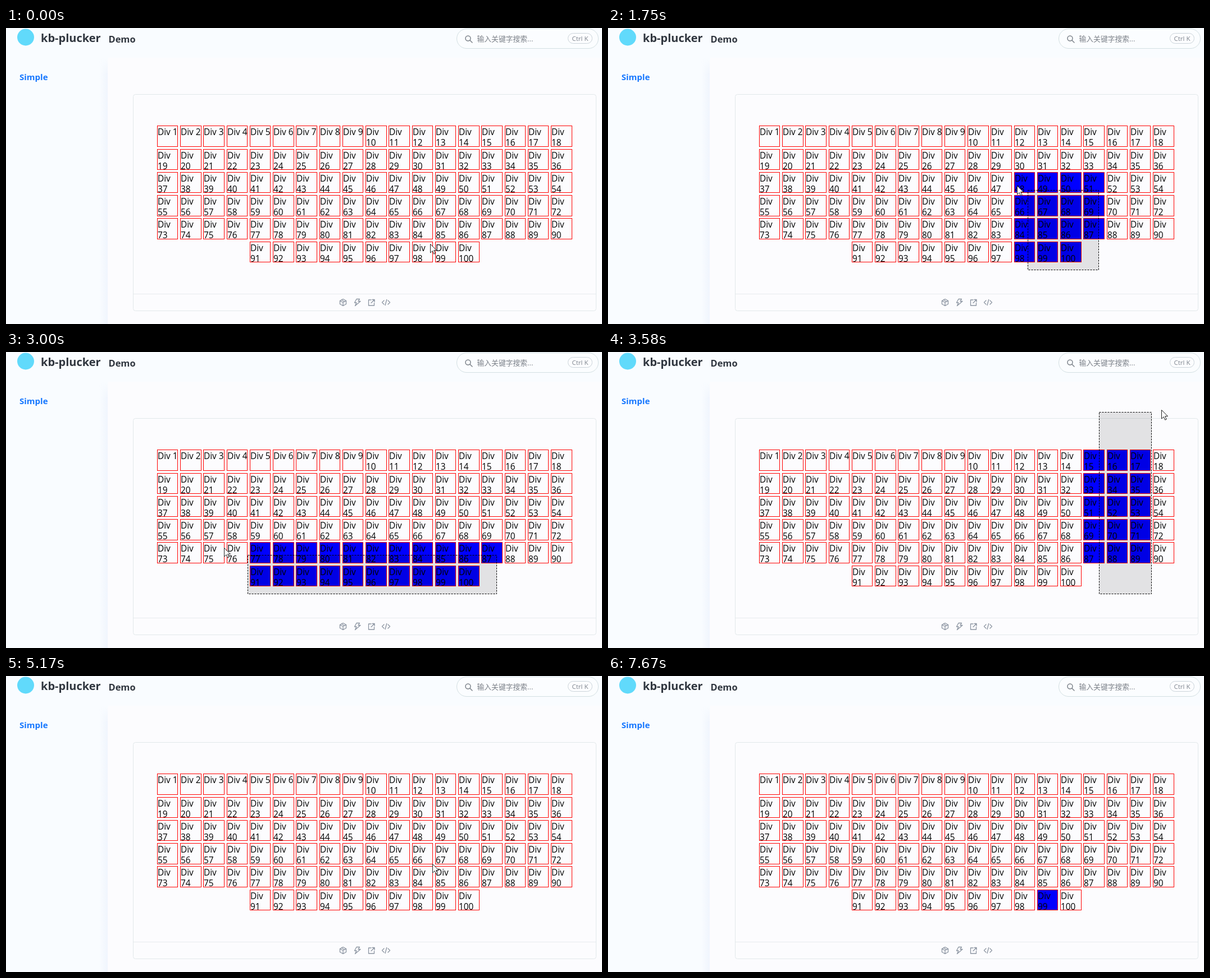
Recreate the animation shown at these times as an HTML page. Size 1061x528 px, loop 8160 ms.

```html
<!DOCTYPE html>
<html lang="zh">
<head>
<meta charset="utf-8">
<title>Box selection demo</title>
<style>
html, body { margin: 0; width: 100%; height: 100%; overflow: hidden; background: #f9fcff; }
svg { display: block; position: absolute; left: 0; top: 0; }
text { font-family: "Open Sans", "Noto Sans", sans-serif; }
.bold { font-weight: 700; }
.cjk { font-family: "Open Sans", "Noto Sans CJK SC", "Noto Sans CJK", sans-serif; }
.cell rect { fill: transparent; stroke: #f00; }
.cell.on rect { fill: #00f; }
.cell text { font-size: 15.4px; }
.icon { fill: none; stroke: #8b94a1; stroke-width: 1.3; stroke-linejoin: round; stroke-linecap: round; }
</style>
</head>
<body>
<svg width="1061" height="528" viewBox="0 0 1061 528">
  <defs>
    <linearGradient id="shade">
      <stop offset="0" stop-color="#f0f5fd" stop-opacity="0"/>
      <stop offset="1" stop-color="#f0f5fd"/>
    </linearGradient>
    <linearGradient id="fade" x2="0" y2="1">
      <stop offset="0" stop-color="#f9fcff"/>
      <stop offset="1" stop-color="#f9fcff" stop-opacity="0"/>
    </linearGradient>
  </defs>
  <rect width="1061" height="528" fill="#f9fcff"/>
  <rect x="166" y="53" width="15" height="475" fill="url(#shade)"/>
  <rect x="166" y="53" width="15" height="30" fill="url(#fade)"/>
  <rect x="181" y="53" width="880" height="475" fill="#fcfcfe"/>

  <circle cx="35" cy="16.5" r="15" fill="#61dafb"/>
  <text class="bold" x="62" y="25" font-size="20" fill="#30363f">kb-plucker</text>
  <text class="bold" x="182.5" y="25.5" font-size="16.4" fill="#30363f">Demo</text>
  <text class="bold" x="24" y="93" font-size="15" fill="#1677ff">Simple</text>

  <rect x="802.5" y="1.5" width="252" height="35" rx="17.5" fill="#fbfdff" stroke="#d3dfe2"/>
  <g fill="none" stroke="#7c828a" stroke-width="1.5" stroke-linecap="round">
    <circle cx="822.5" cy="18.5" r="4.5"/>
    <path d="M826 22l4 4"/>
  </g>
  <text class="cjk" x="838.5" y="23.5" font-size="12.8" fill="#7a7f87">输入关键字搜索...</text>
  <rect x="1000.5" y="9.5" width="43" height="18" rx="9" fill="#fcfdff" stroke="#ccd4da"/>
  <text x="1022" y="22.5" font-size="11.5" fill="#7f858e" text-anchor="middle">Ctrl K</text>

  <rect x="226.5" y="118.5" width="824" height="386" rx="4" fill="none" stroke="#e2e8ea"/>
  <path d="M227 474.5H1050" stroke="#e7ebee"/>
  <g class="icon">
    <path d="M600 483.5l5.5 3v6l-5.5 3-5.5-3v-6zM594.5 486.5l5.5 3 5.5-3M600 489.5v6M597.3 485l5.5 3"/>
    <path d="M624 483.5h5.5l-2.5 4h4l-9.5 8 2.5-5.5h-3.5z"/>
    <path d="M650 485h-4.5v10h10v-4.5M652 484.5h4v4M656 484.5l-6 6"/>
    <path d="M673 486l-3.5 3.5 3.5 3.5M680 486l3.5 3.5-3.5 3.5M677.7 484.5l-2.6 10"/>
  </g>

  <g id="cells"></g>
  <rect id="band" fill="#000" fill-opacity=".1" stroke="#000" stroke-dasharray="3 2"/>
  <path id="pointer" d="M.5.5V16l3.7-3.4 2.5 5.6 2.5-1.1-2.5-5.5H11.5z" fill="#fff" stroke="#222"/>
</svg>
<script>
const NS = 'http://www.w3.org/2000/svg';
const LOOP = 8160, FPS = 12, LAG = 33;
const COLS = 18, SIZE = 37.5, PITCH = 41.25, LEFT = 268.9, TOP = 174.4;
const $ = id => document.getElementById(id);

function add(parent, tag, attrs, text) {
  const el = document.createElementNS(NS, tag);
  setAll(el, attrs);
  if (text) el.textContent = text;
  return parent.appendChild(el);
}

function setAll(el, attrs) {
  for (const name in attrs) el.setAttribute(name, attrs[name]);
}

// A crisp one-pixel outline inside the given edges.
const outline = b => ({
  x: b.left + .5, y: b.top + .5,
  width: Math.max(0, b.right - b.left - 1),
  height: Math.max(0, b.bottom - b.top - 1)
});

// Turning points of the pointer: time, x, y.
const path = [
  [0, 755, 385], [760, 874, 432], [1290, 446, 226], [1450, 780, 320],
  [1750, 728, 281], [2150, 326, 143], [2340, 650, 270], [2580, 967, 118],
  [2760, 740, 424], [3000, 388, 349], [3110, 325, 300], [3600, 987, 103],
  [4130, 440, 310], [4250, 394, 240], [4360, 391, 200], [5000, 759, 335],
  [6083, 759, 335], [6420, 809, 418], [6750, 470, 172], [7000, 427, 215],
  [7080, 400, 240], [7420, 782, 402], [7583, 922, 463]
];

// Cells to the right of limit do not react.
const drags = [
  { from: 760, to: 4450, clear: 5160, x: 874, y: 432, limit: 1061 },
  { from: 6440, to: 7200, clear: 7400, x: 822, y: 437, limit: 803 }
];
const CLICK = 7400, CLICKED = 99, HIDE = 7660;

// Speed along one axis at a key point: zero where the direction turns.
function speed(i, axis) {
  const a = path[i - 1], b = path[i], c = path[i + 1];
  if (!a || !c || (b[axis] - a[axis]) * (c[axis] - b[axis]) <= 0) return 0;
  return (c[axis] - a[axis]) / (c[0] - a[0]);
}

// Smooth cubic through the key points.
function pointerAt(t) {
  const next = path.findIndex(p => p[0] > t);
  if (next < 0) return path[path.length - 1].slice(1);
  const i = next - 1, a = path[i], b = path[next];
  const span = b[0] - a[0], s = (t - a[0]) / span, r = 1 - s;
  return [1, 2].map(axis => Math.round(
    a[axis] * r * r * (1 + 2 * s) + b[axis] * s * s * (3 - 2 * s) +
    span * s * r * (speed(i, axis) * r - speed(next, axis) * s)));
}

const cells = Array.from({ length: 100 }, (_, i) => {
  const row = Math.floor(i / COLS), col = i % COLS + (row === 5 ? 4 : 0);
  const x = LEFT + PITCH * col, y = TOP + PITCH * row;
  const box = {
    id: i + 1, left: Math.round(x), right: Math.round(x + SIZE),
    top: Math.round(y), bottom: Math.round(y + SIZE)
  };
  box.el = add($('cells'), 'g', { class: 'cell' });
  add(box.el, 'rect', outline(box));
  const lines = i < 9 ? [`Div ${i + 1}`] : ['Div', `${i + 1}`];
  lines.forEach((line, n) =>
    add(box.el, 'text', { x: box.left + 1, y: box.top + 17 + 19 * n }, line));
  return box;
});

function bandAt(drag, t) {
  const [x, y] = pointerAt(Math.min(t, drag.to) - LAG);
  return {
    left: Math.min(x, drag.x), right: Math.max(x, drag.x),
    top: Math.min(y, drag.y), bottom: Math.max(y, drag.y)
  };
}

const touches = (a, b, limit) =>
  a.left < Math.min(b.right, limit) && a.right > b.left &&
  a.top < b.bottom && a.bottom > b.top;

function draw(t) {
  const drag = drags.find(d => t >= d.from && t < d.clear);
  const box = drag && bandAt(drag, t);
  for (const cell of cells) {
    const on = box ? touches(cell, box, drag.limit) : t >= CLICK && cell.id === CLICKED;
    cell.el.classList.toggle('on', on);
  }

  const live = drag && t < drag.to;
  $('band').style.display = live ? '' : 'none';
  if (live) setAll($('band'), outline(box));

  $('pointer').style.display = t < HIDE ? '' : 'none';
  $('pointer').setAttribute('transform', `translate(${pointerAt(t)})`);
}

const start = performance.now();
function tick() {
  const t = (performance.now() - start) % LOOP;
  draw(Math.floor(t * FPS / 1000 + .05) * 1000 / FPS);
  requestAnimationFrame(tick);
}
tick();
</script>
</body>
</html>
```
